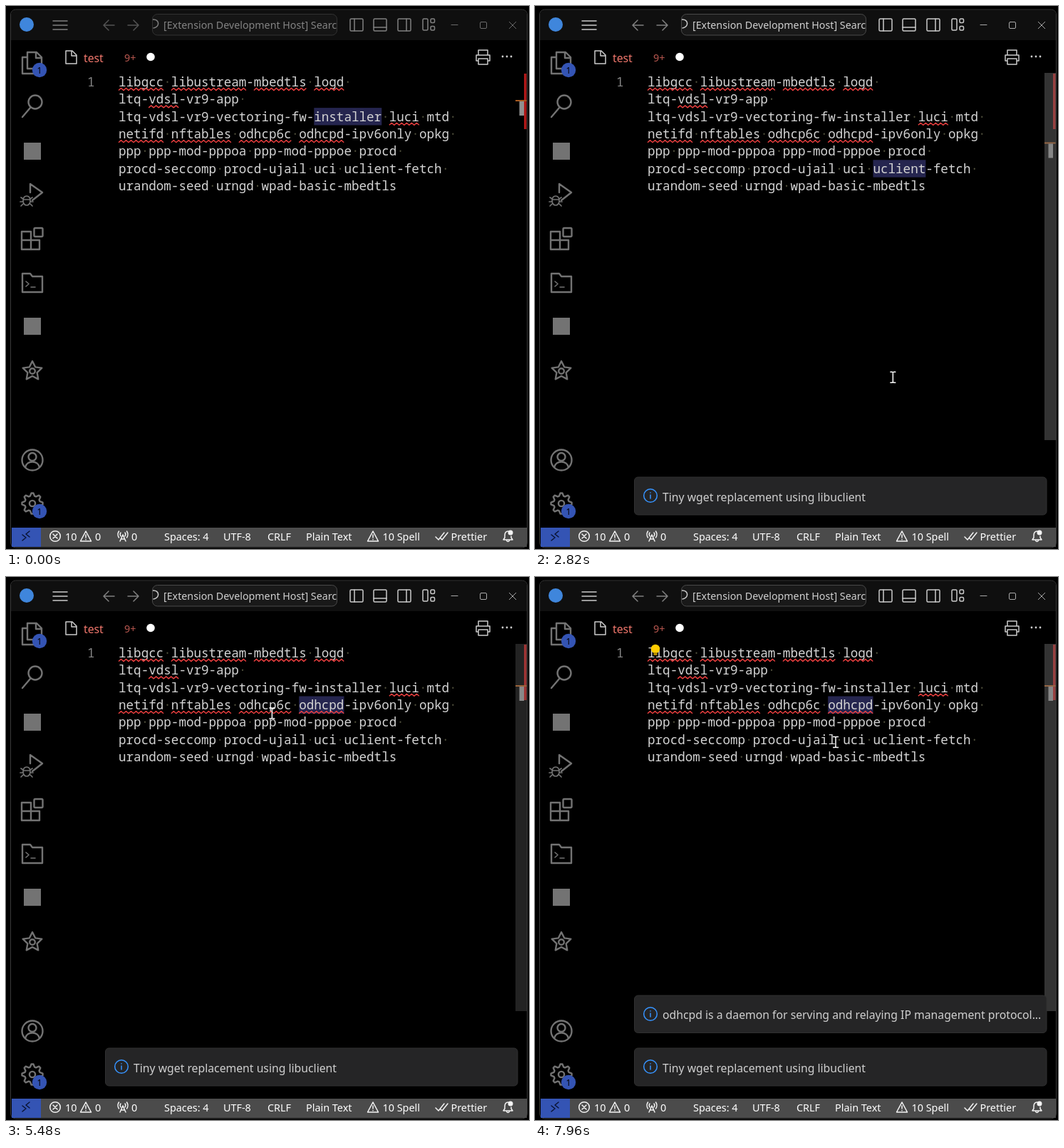
Recreate the animation shown at these times as an HTML page. Size 734 by 763 pixels, loop 8000 ms.

```html
<!DOCTYPE html>
<html lang="en">
<head>
<meta charset="utf-8">
<title>Package info</title>
<style>
html, body { margin: 0; width: 100%; height: 100%; overflow: hidden; background: #000; }
svg { display: block; }
#stage { width: 100vw; height: 100vh; }
text { font: 15.76px "Noto Sans", sans-serif; fill: #d0d0d0; white-space: pre; }
.mono text { font: 500 17.58px "Noto Sans Mono", monospace; fill: #d4d4d4; }
.small text { font-size: 14.4px; }
#titleBar text { font-size: 14.25px; }
.status text { fill: #fff; }
.line { fill: none; stroke: #ccc; stroke-width: 1.5; stroke-linejoin: round; stroke-linecap: round; }
.thin .line { stroke: #aaa; stroke-width: 1; }
.side .line { stroke: #737373; stroke-width: 2.4; }
.status .line { stroke: #f4f4f4; }
.key text { font-size: 13.5px; }
</style>
</head>
<body>
<svg id="stage" viewBox="0 0 734 763"></svg>
<script>
const LOOP = 8000, CHAR = 10.55, LEFT = 158, TOP = 94.3, LEADING = 24.4, ROW = 28.3;
const LINES = [
  'libgcc libustream-mbedtls logd ',
  'ltq-vdsl-vr9-app ',
  'ltq-vdsl-vr9-vectoring-fw-installer luci mtd ',
  'netifd nftables odhcp6c odhcpd-ipv6only opkg ',
  'ppp ppp-mod-pppoa ppp-mod-pppoe procd ',
  'procd-seccomp procd-ujail uci uclient-fetch ',
  'urandom-seed urngd wpad-basic-mbedtls'];
const MISSPELLED = [['libgcc', 'libustream', 'mbedtls', 'logd'], ['vdsl'], ['luci'],
  ['netifd', 'nftables', 'odhcp6c', 'odhcpd']];
const COMMANDS = ['Show OpenWRT Package Info', '', 'Expand URL to Markdown',
  'Sync Settings: Upload (user -&gt; repository)', 'Preferences: Color Theme',
  'LaTeX Workshop: Build with recipe', 'Compare against previously selected Commit',
  'Sort Lines Ascending', 'Format Document', 'Black Formatter: Restart Server', 'Transform to Uppercase'];
const ABOUT = ['odhcpd is a daemon for serving and relaying IP', 'management protocols to configure clients and',
  'downstream routers. It tries to follow the RFC 6204', 'requirements for IPv6 home routers. This is a variant',
  'providing server services for RA, stateless and stateful', 'DHCPv6, prefix delegation and can be used to relay RA,',
  'DHCPv6 and NDP between routed (non-bridged)', 'interfaces in case no delegated prefixes are available.'];

// Pointer path: time, x, y of the hot spot.
const POINTER = [[280, 732, 191], [500, 590, 236], [720, 490, 231], [1260, 490, 231], [1270, 494, 241], [1520, 494, 241],
  [1820, 363, 117], [2000, 330, 84], [2340, 330, 88], [2700, 460, 430], [3100, 600, 733], [3180, 600, 733],
  [3500, 640, 560], [3860, 514, 323], [3980, 462, 222], [4040, 446, 183], [4940, 446, 183], [5240, 320, 84],
  [5420, 320, 84], [5740, 600, 648], [5860, 664, 614], [5960, 664, 614], [6400, 307, 597], [6580, 307, 597],
  [6590, 307, 602], [6720, 307, 602], [6860, 420, 318], [6980, 520, 330], [7020, 556, 354], [7260, 658, 362],
  [7540, 658, 362], [7780, 540, 290], [7940, 422, 232]];
const SCROLLBAR = [[300, 0], [400, 1], [1540, 1], [1600, .35], [2160, .35], [2200, 1], [2960, 1], [3060, 0],
  [3200, 0], [3260, 1], [4720, 1], [4760, .35], [5460, .35], [5500, 1], [5760, 1], [5880, 0], [6740, 0],
  [6860, 1], [7060, 1], [7200, 0], [7520, 0], [7560, 1]];

const path = (d, extra = '') => `<path class="line" d="${d}" ${extra}/>`;
const rect = (x, y, w, h, fill, extra = '') => `<rect x="${x}" y="${y}" width="${w}" height="${h}" fill="${fill}" ${extra}/>`;
const box = (x, y, w, h) => rect(x, y, w, h, 'none', 'class="line" rx="1.5"');
const disc = (x, y, r, fill) => `<circle cx="${x}" cy="${y}" r="${r}" fill="${fill}"/>`;
const ring = (x, y, r, extra = '') => `<circle class="line" cx="${x}" cy="${y}" r="${r}" ${extra}/>`;
const text = (x, y, s, extra = '') => `<text x="${x}" y="${y}" ${extra}>${s}</text>`;
const group = (attrs, ...parts) => `<g ${attrs}>${parts.join('')}</g>`;
const polar = (x, y, r, a) => `${(x + r * Math.cos(a)).toFixed(2)} ${(y + r * Math.sin(a)).toFixed(2)}`;
const lineTop = i => TOP + i * LEADING;
const wordX = (i, word) => LEFT + LINES[i].indexOf(word) * CHAR;

function gear(x, y, r) {
  const points = Array.from({ length: 32 }, (_, i) =>
    polar(x, y, i % 4 < 2 ? r : r * .74, (i - .5) * Math.PI / 16));
  return path(`M${points.join('L')}Z`) + ring(x, y, r * .28);
}
function star(x, y, r) {
  const points = Array.from({ length: 10 }, (_, i) => polar(x, y, i % 2 ? r * .5 : r, (i - 2.5) * Math.PI / 5));
  return path(`M${points.join('L')}Z`) + ring(x, y, r * .27);
}
function squiggle(i, word) {
  const x = wordX(i, word), y = lineTop(i) + 24.2, step = 3.5;
  let d = `M${x} ${y}`;
  for (let n = 1; n * step <= word.length * CHAR; n++) d += `L${x + n * step} ${y - (n % 2) * 3}`;
  return `<path d="${d}" fill="none" stroke="#f04040" stroke-width="1.4"/>`;
}
function keys(labels, widths, x, y) {
  return labels.map((label, i) => {
    const w = widths[i], cx = x + w / 2;
    x += w + 1;
    return (w > 20 ? rect(cx - w / 2, y - 12, w, 23, '#303030', 'rx="4" stroke="#3d3d3d"') : '') +
      text(cx, y + 4.5, label, 'text-anchor="middle"');
  }).join('');
}
const warning = x => path(`M${x} 738l7.5 14h-15zM${x} 743v4M${x} 749.5v.2`);
const info = y => ring(162, y, 9.3, 'style="stroke:#3794ff"') +
  path(`M162 ${y - 1}v5M162 ${y - 4.3}v.2`, 'style="stroke:#3794ff"');
const cross = (x, y, r) => path(`M${x - r} ${y - r}l${2 * r} ${2 * r}M${x + r} ${y - r}l${-2 * r} ${2 * r}`);
const noteBox = (id, y, h) => rect(139.5, y, 578.5, h, '#252526', `id="${id}" rx="5" stroke="#303030"`);

const titleBar = group('id="titleBar"',
  path('M66 21h20M66 27h20M66 33h20'),
  group('opacity=".6"', path('M152 27h-15m7-7-7 7 7 7', 'id="back"'), path('M171 27h15m-7-7 7 7-7 7')),
  rect(205.5, 11.5, 259, 29.5, '#191919', 'rx="7" stroke="#4a4a4a"'),
  '<svg x="206" y="11" width="258" height="30">', path('M0 8c10-1 10 11 1 12'), text(15, 21, '[Extension Development Host] Search'), '</svg>',
  box(483, 18, 18, 17), path('M489 18v17'), box(516, 18, 18, 17), path('M516 30h18'),
  box(550, 18, 18, 17), path('M562 18v17'), box(585, 18, 7, 16), box(596, 18, 5.5, 5.5), box(596, 28.5, 5.5, 5.5),
  group('class="thin"', path('M625 26.5h9'), box(665.5, 22.5, 9, 9), cross(711, 27, 4.7)));

const sideBar = group('class="side"',
  path('M30 65h13l7 7v16H30zM42 65v8h8M30 72h-7v23h18v-7'),
  ring(41, 135, 9.5), path('M34 143 23 156'),
  rect(25, 192, 24, 24, '#737373'),
  path('M34 262v-12l17 12-14 11'),
  path('M29 267c-4 0-5 4-5 7s2 6 5 6 5-3 5-6-1-7-5-7zM24 272h10M21 269l3 2M37 269l-3 2M20 275h4M34 275h4M21 281l3-3M37 281l-3-3', 'style="stroke-width:1.7"'),
  path('M22 317h13v12h12v13H22zM22 329h13v13'), box(39.5, 312, 12, 12),
  path('M23 376h11l3 4h14v22H23z'), path('M28 387l4 3.5-4 3.5M35 395h6', 'style="stroke-width:1.6"'),
  rect(25, 438, 24, 24, '#737373'),
  star(37, 513, 14), ring(37, 638, 14.5), ring(37, 633.5, 5.5), path('M27 648c2-10 18-10 20 0'), gear(37, 699, 14.6),
  [90, 710].map(y => disc(47, y, 10.2, '#3454b4') + text(47, y + 4.5, '1', 'text-anchor="middle" style="font-size:12px;fill:#000"')).join(''));

const tabRow = path('M84 63h9l6 6v12H84zM92 63v7h7') + text(109, 79, 'test', 'style="fill:#f0776c"') +
  text(166, 78, '9+', 'style="fill:#b8574f;font-size:14.4px"') + disc(203, 71.5, 5.8, '#fff') +
  path('M663 69v-7h13v7M663 77h-3v-8h19v8h-3M663 74h13v8h-13z') + [697, 703, 709].map(x => disc(x, 71, 1.4, '#ccc')).join('');

const code = group('id="code" class="mono"', LINES.map((line, i) =>
  text(LEFT, lineTop(i) + 18.4, line.replace(/ /g, '<tspan fill="#4d4d3a">·</tspan>'))).join(''));
const editor = rect(0, 0, 0, LEADING, '#25254f', 'id="highlight"') +
  group('class="mono"', text(114, 112.7, '1', 'style="fill:#858585"')) + code +
  MISSPELLED.map((words, i) => words.map(w => squiggle(i, w)).join('')).join('') +
  rect(0, 0, 2, 23, '#ddd', 'id="caret"') +
  group('id="bulb"', disc(169, 101, 6.2, '#fc0'), rect(166.5, 106, 5, 4, '#b89000')) +
  group('id="minimap"', rect(649, 94, 65, 62, '#111'), rect(649, 94, 65, 10, '#360d0d'),
    '<use href="#code" transform="translate(636.4 85) scale(.105)"/>') +
  rect(727, 95, 3.5, 78, '#b01818') +
  group('id="mark"', rect(715, -1, 15.5, 2, '#a85a20'), rect(720.5, 1, 6.5, 20, '#909090', 'id="markBlock"')) +
  rect(715, 94, 16, 516, '#797979', 'id="scrollbar"');

const notes = group('id="noteA"', noteBox('boxA', 662, 53), info(688), text(179, 695.5, 'Tiny wget replacement using libuclient'),
    group('id="toolsA"', gear(659, 688, 9), cross(693, 688, 5.5))) +
  group('id="noteB"', noteBox('boxB', 588, 52.5),
    group('id="shortB"', info(614), text(179, 621, '', 'id="summary"'),
      group('id="toolsB"', gear(626, 614, 9), path('M653 617l6-6 6 6'), cross(693, 614, 5.5))),
    group('id="longB"', info(361), ABOUT.map((s, i) => text(179, 368.5 + i * ROW, s)).join(''),
      text(152, 622.5, 'Source: OpenWRT Package Info'), gear(626, 361, 9), path('M653 358.5l6 6 6-6'), cross(693, 361, 5.5)));

const statusBar = group('class="status small"',
  rect(8, 733, 723, 27, '#4b4b4b'), rect(8, 733, 41, 27, '#3454b4'),
  path('M23 743l5 4-5 4M33 738l-5 4 5 4', 'style="stroke:#0a1433"'),
  ring(69, 745, 7.3), cross(69, 745, 3), text(83, 750.5, '10'), warning(112), text(125, 750.5, '0'),
  path('M164 743l-4 9M164 743l4 9M162 749h4M161 745c-1-2-1-4 0-5M167 745c1-2 1-4 0-5M158.500 747c-2-3-2-6 0-9M169.500 747c2-3 2-6 0-9'),
  text(176, 750.5, '0'), text(222, 750.5, 'Spaces: 4'), text(305, 750.5, 'UTF-8'), text(367, 750.5, 'CRLF'),
  text(421, 750.5, 'Plain Text'), warning(515), text(528.5, 750.5, '10 Spell'),
  path('M603 746l4 4 8-10M610 748l2 2 8-10'), text(624.5, 750.5, 'Prettier'),
  path('M705 738c-4 0-5 3-5 6v3l-2 3h13l-2-3v-2M702.5 751c1 2 3 2 4 0'), disc(708, 740, 3.5, '#f4f4f4'));

const rows = COMMANDS.map((name, i) => text(164.5, 88 + i * ROW, name)).join('');
const palette = group('id="palette"',
  rect(144, 12.5, 450, 352, '#232324', 'rx="7" style="filter:drop-shadow(0 0 6px #000)"'),
  rect(151, 22, 436, 35, '#000'), text(161, 46.5, '&gt;'), rect(171, 30, 1.5, 21, '#ddd', 'id="inputCaret"'),
  rect(587.5, 67, 6.5, 26, '#4c4c4c'), rect(150.5, 96, 437.5, ROW, '#404040', 'id="hoverRow" rx="3"'),
  rect(150.5, 68, 437.5, ROW, '#6e6e6e', 'rx="3"'),
  '<svg width="594" height="364">', rows, '</svg>',
  `<path transform="translate(176 104)" fill="#ffc83d" d="M-3 0c0-3 4-3 4 0v4l7 2c2 1 2 7-1 10h-8l-7-7c-1-3 2-3 3-2l2 1z"/>`,
  text(192, 88 + ROW, '', 'id="crates"'), text(441, 88, 'recently used'), gear(557, 81, 9),
  text(505, 88 + 6 * ROW, 'git.co...', 'style="font-size:14.4px;fill:#999"'),
  group('id="themeKeys" class="key"', keys(['Ctrl', '+', 'K'], [37, 14, 23], 398, 196), keys(['Ctrl', '+', 'T'], [37, 14, 23], 488, 196)),
  group('class="key"', keys(['Shift', '+', 'Alt', '+', 'F'], [43, 15, 33, 15, 22], 433, 309)),
  group('id="hoverGear"', gear(557, 0, 9)));

const cursors = group('id="pointer" fill="#fff" stroke="#000" stroke-width=".8"',
  '<path id="hand" transform="translate(-.8 -1.2)" d="M-1.7 1c0-2.2 3.4-2.2 3.4 0v5.5l5 1.2c2 .5 2.2 2 1.8 4L7 17.5H-.5L-5 11c-1.2-2 .8-3 2-1.6l1.3 1.2z"/>',
  '<path id="beam" fill="none" stroke="#fff" stroke-width="1.5" d="M-4-7.5h3l1 1 1-1h3M0-6.5v13M-4 7.5h3l1-1 1 1h3"/>',
  '<path id="resize" d="M-9 0l6-5v3.5h6V-5l6 5-6 5V1.5h-6V5z"/>');

document.getElementById('stage').innerHTML =
  rect(6.5, 5, 725, 756, '#000', 'rx="7" stroke="#3a3a3a"') +
  '<path d="M7 48V12q0-6 6-6h712q6 0 6 6v36z" fill="#0f0f0f"/>' + disc(29, 26, 10, '#3f86dc') +
  titleBar + sideBar + tabRow + editor + notes + statusBar + palette + cursors;

const $ = id => document.getElementById(id);
const show = (id, on) => { $(id).style.display = on ? '' : 'none'; };
const set = (id, attrs) => { for (const k in attrs) $(id).setAttribute(k, attrs[k]); };
const within = (t, a, b) => t >= a && t < b;

function sample(track, t) {
  const n = track.findIndex(k => k[0] > t);
  if (n === 0) return track[0].slice(1);
  if (n < 0) return track[track.length - 1].slice(1);
  const a = track[n - 1], b = track[n], f = (t - a[0]) / (b[0] - a[0]);
  return a.slice(1).map((v, i) => v + (b[i + 1] - v) * f);
}

function draw(t) {
  const [x, y] = sample(POINTER, t), [, oldY] = sample(POINTER, t - 40);
  const open = within(t, 1520, 2120) || within(t, 4380, 5420);
  const hasA = t >= 2160, hasB = t >= 5500, expanded = within(t, 5880, 7520);
  const noteTop = expanded ? 335 : 588;
  const inColumn = x > 139 && x < 718;
  const overA = hasA && inColumn && y > 662 && y < 715;
  const overB = hasB && inColumn && y > noteTop && y < 640;
  const hoverB = overB && oldY > noteTop;

  // Editor: the occurrence highlight follows the click after a short delay.
  const [line, word] = t < 740 ? [2, 'installer'] : t < 4040 ? [5, 'uclient'] : [3, 'odhcpd'];
  const settled = !within(t, 740, 980) && !within(t, 4040, 4220);
  show('highlight', settled);
  set('highlight', { x: wordX(line, word), y: lineTop(line), width: word.length * CHAR });
  show('caret', within(t, 740, 1120) || within(t, 4040, 4220));
  set('caret', { x: t < 2000 ? 485 : 443, y: lineTop(line) + 1 });
  set('mark', { transform: `translate(0 ${{ 2: 133, 5: 192.5, 3: 153 }[line]})` });
  show('markBlock', settled);
  set('scrollbar', { opacity: sample(SCROLLBAR, t)[0] * .42 });
  show('minimap', within(t, 340, 700) || within(t, 3300, 3960));
  show('bulb', t >= 5700);
  set('titleBar', { opacity: t < 740 ? .6 : 1 });
  show('back', !open);

  show('noteA', hasA);
  show('toolsA', overA);
  set('boxA', { fill: overA ? '#424242' : '#252526' });
  show('noteB', hasB);
  show('shortB', !expanded);
  show('longB', expanded);
  show('toolsB', overB);
  set('boxB', { y: noteTop, height: 640.5 - noteTop, fill: hoverB ? '#424242' : '#252526' });
  $('summary').textContent = ABOUT[0] + (overB ? ' manage...' : ' management protocol...');

  const row = Math.floor((y - 68) / ROW), hovering = row > 0 && row < 11;
  show('palette', open);
  show('inputCaret', within(t, 2020, 2120) || within(t, 4380, 5300));
  show('hoverRow', hovering);
  show('hoverGear', hovering);
  set('hoverRow', { y: 68 + row * ROW });
  set('hoverGear', { transform: `translate(0 ${81.5 + row * ROW})` });
  set('themeKeys', { transform: `translate(${row === 4 ? -31 : 0} 0)` });
  $('crates').textContent = 'Crates: Do not call manually ! Replace ' + (row === 1 ? 'Versio...' : 'Version of ...');

  const edge = t < 300;
  const hand = !edge && (overA || overB || y > 732 || (open && y > 66));
  show('pointer', t >= 100);
  show('resize', edge);
  show('hand', hand);
  show('beam', !edge && !hand);
  set('pointer', { transform: `translate(${x} ${y})` });
}

function tick() {
  draw(performance.now() % LOOP);
  requestAnimationFrame(tick);
}
tick();
</script>
</body>
</html>
```
